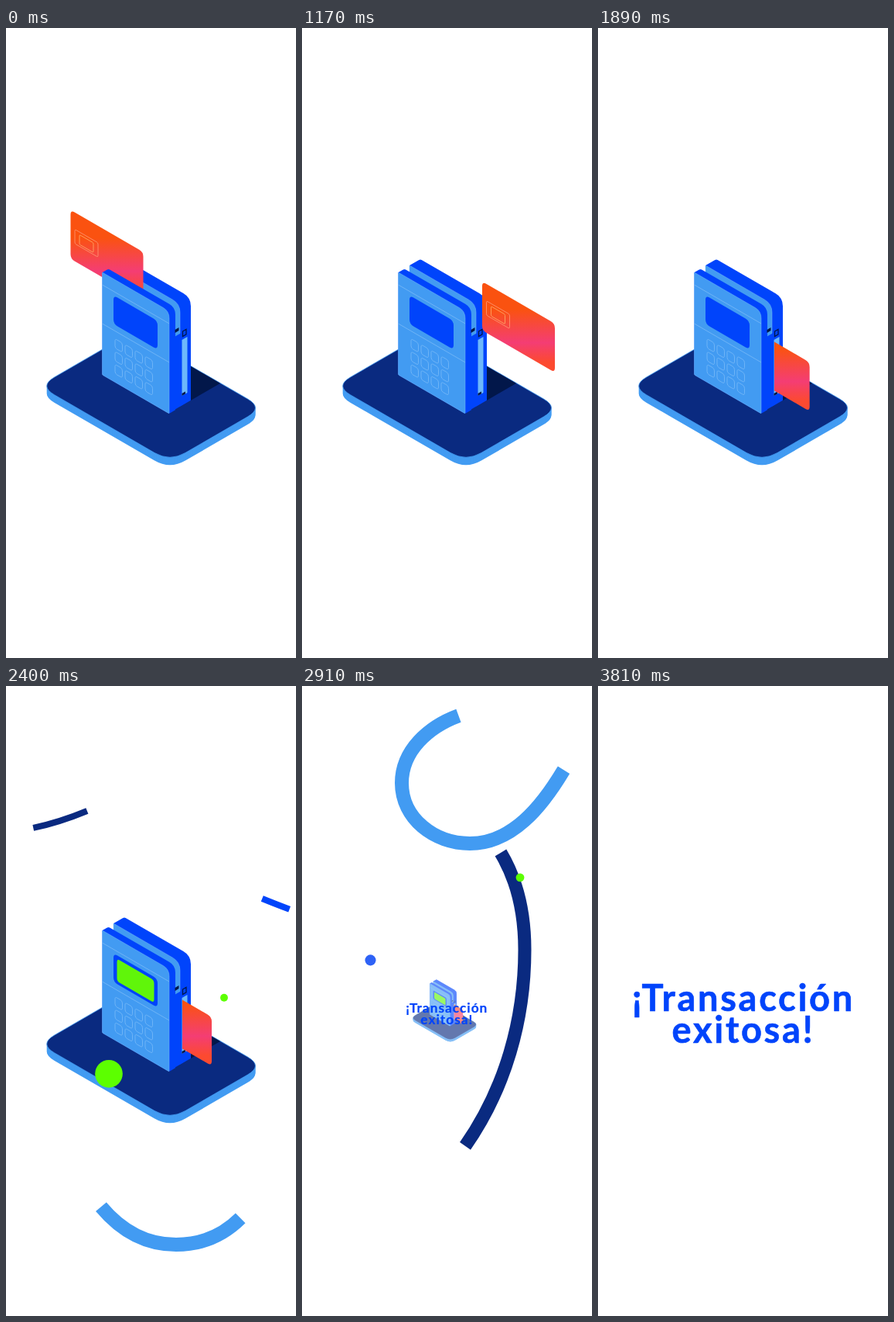
These frames come from a looping animation (375x812 px, 4080 ms). An HTML page:

```html
<!DOCTYPE html>
<html lang="es">
<head>
<meta charset="utf-8">
<style>
html, body { margin: 0; width: 100%; height: 100%; overflow: hidden; background: #fff; }
svg { display: block; width: 375px; height: 812px; }
text { font: 700 47px Lato, "Open Sans", sans-serif; letter-spacing: 2.7px; text-anchor: middle;
  fill: #0044fb; stroke: #0044fb; stroke-width: .6; stroke-linejoin: round; }
</style>
</head>
<body>
<svg viewBox="0 0 375 812">
  <defs>
    <linearGradient id="heat" x2="0" y2="1">
      <stop offset=".3" stop-color="#fa5210"/>
      <stop offset=".68" stop-color="#f43d74"/>
      <stop offset=".9" stop-color="#fc4a30"/>
    </linearGradient>
    <clipPath id="slot"><path d="M228 0H375V812H228z"/></clipPath>
  </defs>
  <g id="scene"></g>
  <g id="lines" fill="none"></g>
  <g id="bubbles"></g>
  <g id="message">
    <text x="188" y="419">¡Transacción</text>
    <text x="188" y="460">exitosa!</text>
  </g>
</svg>
<script>
const LOOP = 4080, STEP = 30, SLOPE = Math.tan(Math.PI / 6);
const SKY = '#429bf2', BLUE = '#0044fb', NAVY = '#0a2a80', DARK = '#02174a',
      GREEN = '#5cff00', DOT = '#2e62f6', EDGE = '#79baf8';
const $ = id => document.getElementById(id);
const span = (t, a, b) => Math.min(1, Math.max(0, (t - a) / (b - a)));
const quad = p => p < .5 ? 2 * p * p : 1 - 2 * (1 - p) ** 2;
const fill = c => `fill="${c}"`;
const line = (c, w = .8) => `fill="none" stroke="${c}" stroke-width="${w}"`;
const faced = c => `fill="${c}" stroke="${EDGE}" stroke-width=".5"`;

// Polygon with rounded corners; a point may carry its own radius.
function poly(pts, attrs, radius = 0) {
  const n = pts.length;
  const toward = ([x, y], [u, v], r) => {
    const k = r / Math.hypot(u - x, v - y);
    return `${x + (u - x) * k} ${y + (v - y) * k}`;
  };
  const d = pts.map((p, i) => {
    const r = p[2] ?? radius;
    return `${i ? 'L' : 'M'}${toward(p, pts[(i + n - 1) % n], r)}Q${p[0]} ${p[1]} ${toward(p, pts[(i + 1) % n], r)}`;
  }).join('');
  return `<path d="${d}z" ${attrs}/>`;
}

// Isometric faces: upright facing left, upright facing right, and flat.
const panel = (x, y, w, h, attrs, r, corner = r, slope = SLOPE) =>
  poly([[x, y], [x + w, y + w * slope, corner], [x + w, y + w * slope + h], [x, y + h]], attrs, r);
const side = (x, y, w, h, attrs) => panel(x, y, w, h, attrs, 0, 0, -SLOPE);
const ground = (x, y, u, v, attrs, r) =>
  poly([[x, y], [x + u, y - u * SLOPE], [x + u + v, y + (v - u) * SLOPE], [x + v, y + v * SLOPE]], attrs, r);

function block(x, y, w, h, depth, round) {
  const drop = w * SLOPE, lift = depth * SLOPE;
  return poly([[x, y], [x + depth, y - lift, 2], [x + w + depth, y + drop - lift, round],
      [x + w + depth, y + drop - lift + h], [x + w, y + drop + h, 2], [x, y + h, 2]], fill(BLUE)) +
    panel(x, y, w, h, faced(SKY), 1, round);
}

function base() {
  let s = '';
  for (let dy = 10; dy >= 0; dy--)
    s += ground(42.8, 461.4 + dy, 120.4, 169.2,
      dy ? fill(SKY) : `fill="${NAVY}" stroke="${SKY}" stroke-width=".8"`, 23);
  return s + ground(201, 458, 38, 38, fill(DARK));
}

const card = id => `<g id="${id}">` +
  panel(83.5, 234.5, 94, 63, fill('url(#heat)'), 6) +
  panel(89, 259.5, 30, 18.5, line('#ff9a78'), 2) +
  panel(95, 266.5, 18, 12.5, line('#ffb06a'), 1.5) + '</g>';

function front() {
  const x = 124.5, w = 86.5, seam = y => `M${x} ${y}l${w} ${w * SLOPE}`;
  let s = side(211, 402, 28, 94, fill(BLUE)) + block(x, 315, w, 132, 8, 9) +
    `<path d="${seam(331)}${seam(381)}" ${line(EDGE)}/>` +
    panel(139, 344.5, 57, 37, fill(BLUE), 6) +
    `<g id="glow">${panel(143.5, 351.5, 48, 29, fill('#60f50a'), 4)}</g>`;
  for (let row = 0; row < 3; row++)
    for (let col = 0; col < 4; col++)
      s += panel(141 + col * 13, 400.5 + col * 13 * SLOPE + row * 16.5, 9.5, 12, line(EDGE), 3);
  return s +
    side(218.5, 389, 5, 4, fill(DARK)) +
    side(228.5, 391, 4.5, 6.5, line(DARK, 1.3)) +
    side(227.5, 402, 7, 72, fill('#6db8fb')) +
    side(227.5, 471, 4.5, 3, fill(DARK));
}

$('scene').innerHTML = base() + block(139, 306, 86, 132, 14, 11) + card('swiped') + front() +
  `<g clip-path="url(#slot)">${card('inserted')}</g>`;

// Ribbons: nodes of [x, y, heading in degrees]; keys of [time, tail node, head node].
const ribbons = [
  { color: NAVY, width: 8,
    nodes: [[-30, 190, 0], [214, 102, -33], [237, 70, -92], [123, -2, -160], [20, -30, -165]],
    keys: [[2300, 0, 0], [2700, 1, 4], [2800, 4, 4]] },
  { color: BLUE, width: 8,
    nodes: [[400, 300, 200], [187, 176, -128], [133, 40, -90], [165, -70, -70]],
    keys: [[2350, 0, 0], [2700, 1, 3], [2810, 3, 3]] },
  { color: NAVY, width: 17,
    nodes: [[-60, 778, -20], [35, 738, -25], [211, 593, -55], [288, 340, -90], [257, 215, -121],
      [160, 130, 180], [80, 210, 90], [170, 290, 0], [296, 70, -70], [322, -60, -80]],
    keys: [[2670, 0, 0], [2700, 0, 1], [2910, 2, 4], [3270, 8, 9], [3330, 9, 9]] },
  { color: SKY, width: 18,
    nodes: [[410, 430, 110], [220, 720, 180], [63, 541, -104], [54, 460, -90], [250, 233, -19],
      [307, 218, -17], [372, 130, -90], [270, 25, 180], [203, 38, 160], [129, 125, 90],
      [217, 203, 0], [338, 109, -59], [430, 150, 90], [222, 456, 155], [110, 490, 163],
      [16, 567, 90], [85, 650, 38], [170, 681, 0], [210, 675, -17], [352, 560, -90], [40, 830, 110]],
    keys: [[2160, 0, 0], [2700, 2, 5], [2910, 8, 11], [3270, 13, 18], [3640, 20, 20]] }
];

const make = (name, parent, attrs) => {
  const el = parent.appendChild(document.createElementNS('http://www.w3.org/2000/svg', name));
  for (const k in attrs) el.setAttribute(k, attrs[k]);
  return el;
};

// Joins two nodes with a curve close to a circular arc.
function bend([x, y, a], [u, v, b]) {
  const rad = Math.PI / 180;
  const turn = Math.abs((b - a + 540) % 360 - 180) * rad;
  const k = Math.hypot(u - x, v - y) * 2 / 3 / (1 + Math.cos(turn / 2));
  return `C${x + k * Math.cos(a * rad)} ${y + k * Math.sin(a * rad)} ` +
    `${u - k * Math.cos(b * rad)} ${v - k * Math.sin(b * rad)} ${u} ${v}`;
}

for (const r of ribbons) {
  r.el = make('path', $('lines'), { stroke: r.color, 'stroke-width': r.width });
  let d = '';
  r.reach = r.nodes.map((node, i) => {
    d += i ? bend(r.nodes[i - 1], node) : `M${node[0]} ${node[1]}`;
    r.el.setAttribute('d', d);
    return r.el.getTotalLength();
  });
}

function drawRibbon({ el, keys, reach }, t) {
  const i = keys.findIndex(k => k[0] > t);
  el.style.display = i > 0 ? '' : 'none';
  if (i < 1) return;
  const a = keys[i - 1], b = keys[i], p = span(t, a[0], b[0]);
  const [tail, head] = [1, 2].map(j => reach[a[j]] + (reach[b[j]] - reach[a[j]]) * p);
  el.setAttribute('stroke-dasharray', `0 ${tail} ${head - tail} 9999`);
}

// Bubbles rise and grow, shrink to a point, then burst into a ring.
const bubbles = [
  { color: GREEN, x: 133, y: 462, grow: 265, end: 2715 },
  { color: GREEN, x: 282, y: 246, grow: 400, end: 2990 },
  { color: DOT, x: 88.5, y: 204.5, grow: 560, end: 3560 },
  { color: DOT, x: 280, y: 318.5, grow: 376, end: 3720 }
];
for (const b of bubbles) {
  b.disc = make('circle', $('bubbles'), { cx: b.x, fill: b.color });
  b.ring = make('circle', $('bubbles'), { cx: b.x, cy: b.y, fill: 'none', stroke: b.color });
}

function drawBubble({ disc, ring, y, grow, end }, t) {
  const peak = end - 290, p = span(t, peak - grow, peak);
  const r = 19.7 * p * (1 - span(t, peak, end));
  const q = span(t, end - 80, end + 70);
  disc.setAttribute('r', r);
  disc.setAttribute('cy', y + .15 * r + 160 * (1 - p ** 2.5));
  ring.setAttribute('r', q < 1 ? 30 * q : 0);
}

const zoom = (x, y, k) => `translate(${x} ${y}) scale(${k}) translate(${-x} ${-y})`;

function draw(t) {
  const across = quad(span(t, 670, 1090)), down = quad(span(t, 1090, 1530)), inward = quad(span(t, 1530, 2010));
  const dx = 149.5 * across - 61 * inward;
  const dy = 86.5 * (across + down) - 61 * SLOPE * inward;
  const out = t >= 1090;
  $('swiped').style.display = out ? 'none' : '';
  $('inserted').style.display = out ? '' : 'none';
  for (const id of ['swiped', 'inserted']) $(id).setAttribute('transform', `translate(${dx} ${dy})`);
  $('glow').setAttribute('opacity', span(t, 2130, 2370));

  const p = span(t, 2700, 3270);
  $('scene').setAttribute('opacity', 1 - p);
  $('scene').setAttribute('transform', zoom(183, 413, (1 - p) ** 2.6));
  $('message').style.display = p ? '' : 'none';
  $('message').setAttribute('transform', zoom(187, 422, p));
  for (const r of ribbons) drawRibbon(r, t);
  for (const b of bubbles) drawBubble(b, t);
}

const start = performance.now();
function frame() {
  const t = (performance.now() - start) % LOOP;
  draw(Math.floor(t / STEP) * STEP);
  requestAnimationFrame(frame);
}
frame();
</script>
</body>
</html>
```
